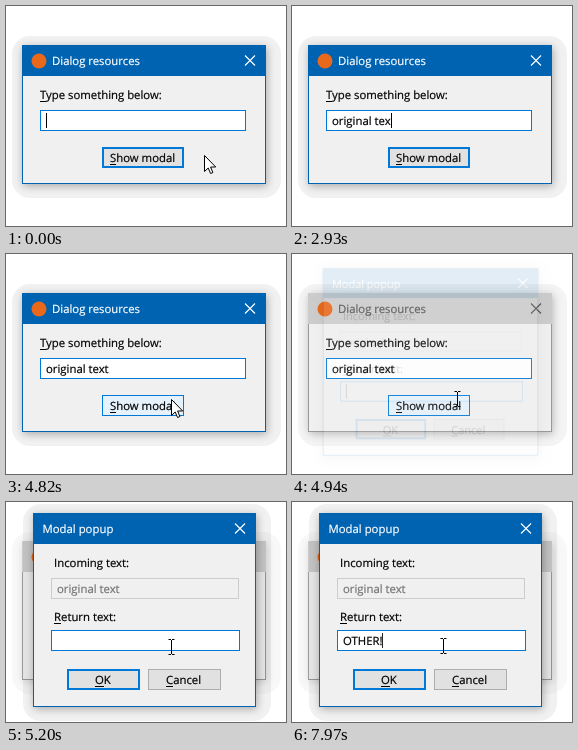
An HTML page for the animation above (8000 ms loop, 280 px wide and 220 px high).

```html
<!DOCTYPE html>
<html lang="en">
<head>
<meta charset="utf-8">
<title>Dialog resources</title>
<style>
  html, body { margin: 0; width: 100%; height: 100%; overflow: hidden; background: #fff; }
  svg { display: block; width: 280px; height: 220px; }
  text { font: 11.35px "Open Sans", "Noto Sans", sans-serif; text-rendering: geometricPrecision; white-space: pre; }
</style>
</head>
<body>
<svg id="stage" viewBox="0 0 280 220" xmlns="http://www.w3.org/2000/svg">
  <defs>
    <filter id="blur" x="-20%" y="-20%" width="140%" height="140%"><feGaussianBlur stdDeviation="4.5"/></filter>
  </defs>
</svg>
<script>
const LOOP = 8000;
const BLUE = '#0063b1', ACCENT = '#0078d7', FACE = '#f0f0f0', BUTTON = '#e1e1e1';
const stage = document.getElementById('stage');

function set(el, attrs) {
  for (const k in attrs) el.setAttribute(k, attrs[k]);
}
function add(parent, tag, attrs) {
  const el = document.createElementNS('http://www.w3.org/2000/svg', tag);
  set(el, attrs);
  return parent.appendChild(el);
}
const rect = (p, x, y, width, height, fill, more) =>
  add(p, 'rect', { x, y, width, height, fill, ...more });

// A thin stroke gives the text the weight of screen type
const ink = color => ({ fill: color, stroke: color, 'stroke-width': 0.2 });

// Label with an optional underline below its first letter
function label(p, x, y, s, color = '#000', underline = 0) {
  const el = add(p, 'text', { x, y, ...ink(color) });
  el.textContent = s;
  if (underline) rect(p, x, y + 2, underline, 1, color);
  return el;
}

// Border drawn inside the given bounds
const bordered = (x, y, w, h, fill, stroke, sw) => ({
  x: x + sw / 2, y: y + sw / 2, width: w - sw, height: h - sw, fill, stroke, 'stroke-width': sw
});
const box = (p, x, y, w, h, fill, stroke, sw = 1) =>
  add(p, 'rect', bordered(x, y, w, h, fill, stroke, sw));

function dialog(x, y, w, h, titleX, title) {
  const g = add(stage, 'g', {});
  const shadow = add(g, 'g', {});
  rect(shadow, x - 10, y - 9, w + 25, h + 23, '#000', { rx: 18, opacity: 0.055 });
  rect(shadow, x + 1, y + 2, w, h, '#000', { opacity: 0.3, filter: 'url(#blur)' });
  const edge = rect(g, x, y, w, h, BLUE);
  rect(g, x + 1, y + 1, w - 2, h - 2, FACE);
  const bar = rect(g, x, y, w, 31, BLUE);
  const name = label(g, titleX, y + 20, title, '#fff');
  const close = add(g, 'path', {
    d: `M${x + w - 21} ${y + 10.5}l10 10m0 -10l-10 10`, stroke: '#fff', 'stroke-width': 1.1
  });
  return { g, shadow, edge, bar, name, close };
}

function field(p, x, y, w, base) {
  box(p, x, y, w, 21, '#fff', ACCENT);
  const text = label(p, x + 6, y + 15, '');
  const caret = rect(p, 0, y + 3, 1, 15, '#000');
  return (s, alpha) => {
    text.textContent = s;
    const width = s ? text.getComputedTextLength() : 0;
    set(caret, { x: Math.round(base + width), opacity: alpha });
  };
}

// Main window
const main = dialog(16, 39, 244, 139, 46, 'Dialog resources');
add(main.g, 'circle', { cx: 33, cy: 55, r: 7.5, fill: '#e8691c' });
label(main.g, 34, 93, 'Type something below:', '#000', 6);
const mainField = field(main.g, 34, 104, 206, 40.4);
const showBtn = box(main.g, 96, 141, 82, 21, BUTTON, ACCENT, 2);
label(main.g, 104, 156, 'Show modal', '#000', 6);

// Popup
const popup = dialog(27, 11, 223, 194, 36.5, 'Modal popup');
label(popup.g, 48, 65, 'Incoming text:');
box(popup.g, 45, 76, 188, 21, FACE, '#cccccc');
label(popup.g, 51, 91, 'original text', '#747474');
label(popup.g, 48, 119, 'Return text:', '#000', 7);
const popupField = field(popup.g, 45, 128, 189, 50.6);
box(popup.g, 61, 167, 73, 21, BUTTON, ACCENT, 2);
label(popup.g, 89, 182, 'OK', '#000', 9);
box(popup.g, 142, 167, 73, 21, BUTTON, '#adadad');
label(popup.g, 160, 182, 'Cancel', '#000', 7);

// Pointers
const arrow = add(stage, 'path', {
  d: 'M.5 .5V16.5L4.2 13 6.6 18.5 8.9 17.5 6.6 12H11.7Z',
  fill: '#fff', stroke: '#000', 'stroke-linejoin': 'round'
});
const beam = add(stage, 'path', {
  d: 'M-3 -7.5H-.5M.5 -7.5H3M0 -7V7M-3 7.5H-.5M.5 7.5H3', stroke: '#000'
});

const clamp = v => Math.max(0, Math.min(1, v));
const ease = v => clamp(v) ** 2 * (3 - 2 * clamp(v));

// Caret that fades on and off, fully on at `peak`
const blink = (t, peak, period) =>
  clamp(0.5 + 1.5 * Math.cos(2 * Math.PI * (t - peak) / period));

// Typing at an even pace between [time, letters] points
function typed(s, t, ...points) {
  let n = 0;
  points.forEach(([start, count], i) => {
    if (t < start) return;
    const [end, next] = points[i + 1] || [start + 1, count];
    n = count + (next - count) * clamp((t - start) / (end - start));
  });
  return s.slice(0, Math.floor(n + 0.01));
}

function place(el, visible, x, y) {
  set(el, { visibility: visible ? 'visible' : 'hidden', transform: `translate(${x} ${y})` });
}

function draw(t) {
  const typing = t >= 1470 && t < 3080;
  const mainCaret = t >= 4560 ? 0 : typing ? 1
    : t < 1470 ? blink(t, 160, 1160) : blink(t, 3220, 840);
  mainField(typed('original text', t, [1470, 1], [1840, 4], [2510, 11], [3080, 13]), mainCaret);
  popupField(typed('OTHER!', t, [6200, 1], [6680, 5], [7290, 6]), blink(t, 5630, 840));

  const hover = t >= 4300, pressed = t >= 4560 && t < 4690;
  set(showBtn, bordered(96, 141, 82, 21,
    pressed ? '#cce4f7' : hover ? '#e5f1fb' : BUTTON,
    pressed ? '#005499' : ACCENT, hover ? 1 : 2));

  // The popup opens in three visible steps while the main window turns grey
  const open = clamp(Math.floor((t - 4810) / 130) / 3);
  const active = open === 0;
  set(main.bar, { fill: active ? BLUE : '#cccccc' });
  set(main.edge, { fill: active ? BLUE : '#9a9a9a' });
  set(main.name, ink(active ? '#fff' : '#555'));
  set(main.close, { stroke: active ? '#fff' : '#555' });
  set(main.shadow, { opacity: 1 - 0.5 * open });
  set(popup.g, {
    opacity: open * open,
    transform: `translate(138.5 107.5) scale(${0.95 + 0.05 * open}) translate(-138.5 -107.5)`
  });

  const reach = ease((t - 4240) / 250);
  const first = t < 1470;
  place(arrow, first || (t >= 3780 && t < 4940),
    first ? 198 : t < 4180 ? 189 : 177 - 12 * reach,
    first ? 149 : 143 + 2 * reach);
  const back = t >= 7970;
  place(beam, back || (t >= 4940 && t < 6200), back ? 151.5 : 165.5, back ? 144 : 145);
}

const t0 = performance.now();
function tick() {
  draw((performance.now() - t0) % LOOP);
  requestAnimationFrame(tick);
}
tick();
</script>
</body>
</html>
```
